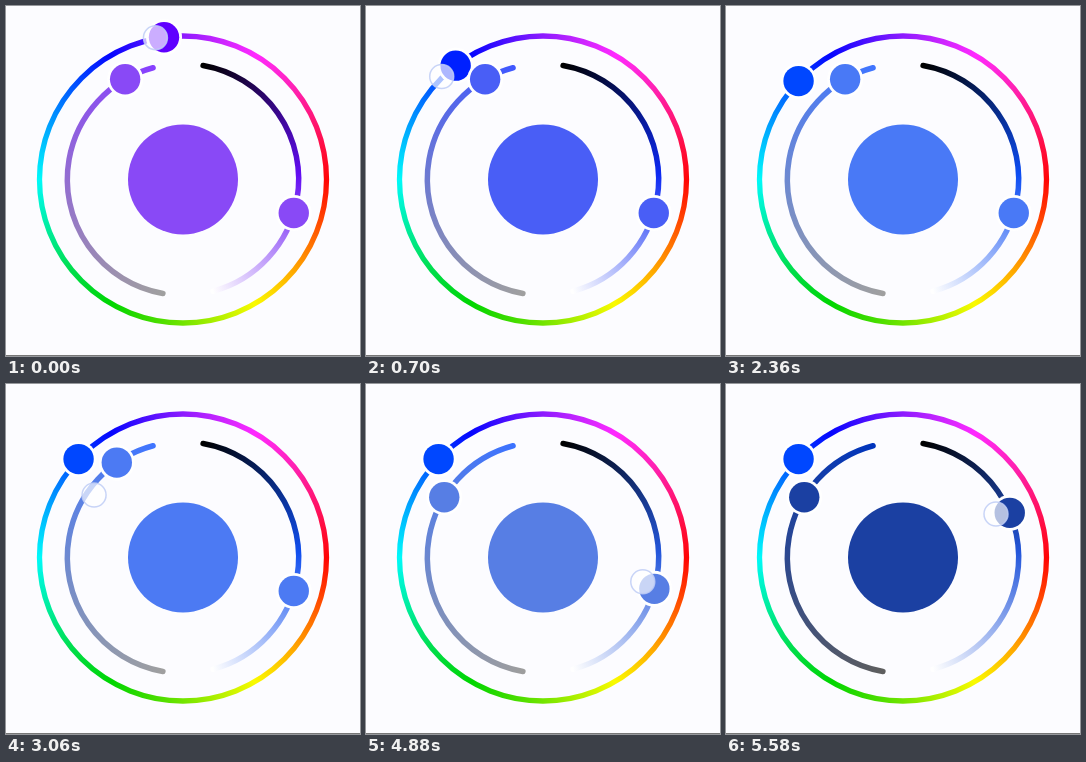
Write an HTML page with a canvas that moves like this. It is 354x350 px and loops after 5680 ms.

```html
<!DOCTYPE html>
<html lang="en">
<head>
<meta charset="utf-8">
<title>Colour wheel</title>
<style>
html, body { margin: 0; width: 100%; height: 100%; overflow: hidden; background: #fcfcff; }
canvas { display: block; width: 354px; height: 350px; }
</style>
</head>
<body>
<canvas id="stage"></canvas>
<script>
const W = 354, H = 350, CX = 177, CY = 173.5;
const LOOP = 5680, LAST = 119;
const RING = 143.5, ARC = 115.7, SPAN = 155;
const SAT_FROM = 100, LIGHT_FROM = -80;

const canvas = document.getElementById('stage');
const ctx = canvas.getContext('2d');
const dpr = window.devicePixelRatio || 1;
canvas.width = W * dpr;
canvas.height = H * dpr;
ctx.scale(dpr, dpr);

// Tracks are [step, value] pairs; angles are in degrees, clockwise from the right.
const hueThumb = [[-6, 268], [0, 262.4], [8, 249.1], [15, 232.5], [20, 225.5], [25, 223.3]];
const satThumb = [[59, 240], [65, 235.1], [70, 219.5], [76, 211.4]];
const lightThumb = [[102, 16.8], [108, 9.5], [113, -3.2], [119, -22.7], [123, -25]];
const touches = [
  { radius: 144.5, angle: [[-6, 266], [0, 259], [8, 240.3], [14, 227], [19, 222.5]], show: [-9, -6, 18, 22] },
  { radius: 108.7, angle: [[57, 240], [61, 231], [65, 215.1], [69, 209.5]], show: [54, 57, 71, 75] },
  { radius: 102.7, angle: [[101, 17], [107, 7], [113, -10.1], [119, -25.1], [123, -28]], show: [98, 101, 130, 134] }
];

const rad = deg => deg * Math.PI / 180;
const clamp = v => Math.max(0, Math.min(1, v));
const hsl = (h, s, l) => `hsl(${h}, ${s * 100}%, ${l * 100}%)`;
const at = (deg, r) => [CX + r * Math.cos(rad(deg)), CY + r * Math.sin(rad(deg))];

function slope(keys, i) {
  if (i === 0 || i === keys.length - 1) return 0;
  const a = keys[i - 1], b = keys[i + 1];
  return (b[1] - a[1]) / (b[0] - a[0]);
}

// Smooth Hermite curve through the keys, held at both ends.
function track(keys, n) {
  const end = keys.length - 1;
  if (n <= keys[0][0]) return keys[0][1];
  if (n >= keys[end][0]) return keys[end][1];
  let i = 0;
  while (n > keys[i + 1][0]) i++;
  const [n0, v0] = keys[i], [n1, v1] = keys[i + 1];
  const d = n1 - n0, u = (n - n0) / d, w = 1 - u;
  return v0 * (1 + 2 * u) * w * w + v1 * u * u * (3 - 2 * u)
    + d * u * w * (slope(keys, i) * w - slope(keys, i + 1) * u);
}

// Uneven playback: steps last 20, 100 and 20 ms in turn.
function stepAt(t) {
  const r = t % 140;
  return Math.min(LAST, 3 * Math.floor(t / 140) + (r < 20 ? 0 : r < 120 ? 1 : 2));
}

function disc(x, y, r, fill) {
  ctx.beginPath();
  ctx.arc(x, y, r, 0, 2 * Math.PI);
  ctx.fillStyle = fill;
  ctx.fill();
}

function thumb(deg, r, fill) {
  const [x, y] = at(deg, r);
  disc(x, y, 18, '#fff');
  disc(x, y, 15.2, fill);
}

function slider(from, colors) {
  const pad = 10;
  const g = ctx.createConicGradient(rad(from - pad), CX, CY);
  colors.forEach((c, i) => g.addColorStop((pad + SPAN * i / (colors.length - 1)) / 360, c));
  g.addColorStop(0.75, colors[colors.length - 1]);
  g.addColorStop(0.75, colors[0]);
  ctx.beginPath();
  ctx.arc(CX, CY, ARC, rad(from), rad(from + SPAN));
  ctx.strokeStyle = g;
  ctx.lineWidth = 5.5;
  ctx.lineCap = 'round';
  ctx.stroke();
}

const wheel = ctx.createConicGradient(0, CX, CY);
for (let h = 0; h <= 360; h += 10) {
  wheel.addColorStop(h / 360, hsl(h, 1, 0.5 - 0.08 * Math.cos(rad(h - 120)) ** 3));
}

function touch({ radius, angle, show }, n) {
  const [a, b, c, d] = show;
  const alpha = Math.min(clamp((n - a) / (b - a)), clamp((d - n) / (d - c)));
  if (!alpha) return;
  const [x, y] = at(track(angle, n), radius);
  ctx.globalAlpha = alpha;
  disc(x, y, 12, 'rgba(255, 255, 255, 0.68)');
  ctx.strokeStyle = 'rgba(190, 204, 246, 0.85)';
  ctx.lineWidth = 1.5;
  ctx.stroke();
  ctx.globalAlpha = 1;
}

function draw(n) {
  const hue = track(hueThumb, n);
  const satAngle = track(satThumb, n);
  const lightAngle = track(lightThumb, n);
  const s = (satAngle - SAT_FROM) / SPAN;
  const l = (lightAngle - LIGHT_FROM) / SPAN;
  const color = hsl(hue, s, l);

  ctx.fillStyle = '#fcfcff';
  ctx.fillRect(0, 0, W, H);
  ctx.fillStyle = '#777';
  ctx.fillRect(0, 349, W, 1);

  ctx.beginPath();
  ctx.arc(CX, CY, RING, 0, 2 * Math.PI);
  ctx.strokeStyle = wheel;
  ctx.lineWidth = 5.3;
  ctx.stroke();

  slider(SAT_FROM, [hsl(hue, 0, l), hsl(hue, 1, l)]);
  slider(LIGHT_FROM, ['#000', hsl(hue, s, 0.5), '#fff']);
  disc(CX, CY, 55, color);

  thumb(hue, RING, hsl(hue, 1, 0.5));
  thumb(satAngle, ARC, color);
  thumb(lightAngle, ARC, color);
  touches.forEach(p => touch(p, n));
}

const start = performance.now();
function tick() {
  draw(stepAt((performance.now() - start) % LOOP));
  requestAnimationFrame(tick);
}
tick();
</script>
</body>
</html>
```
